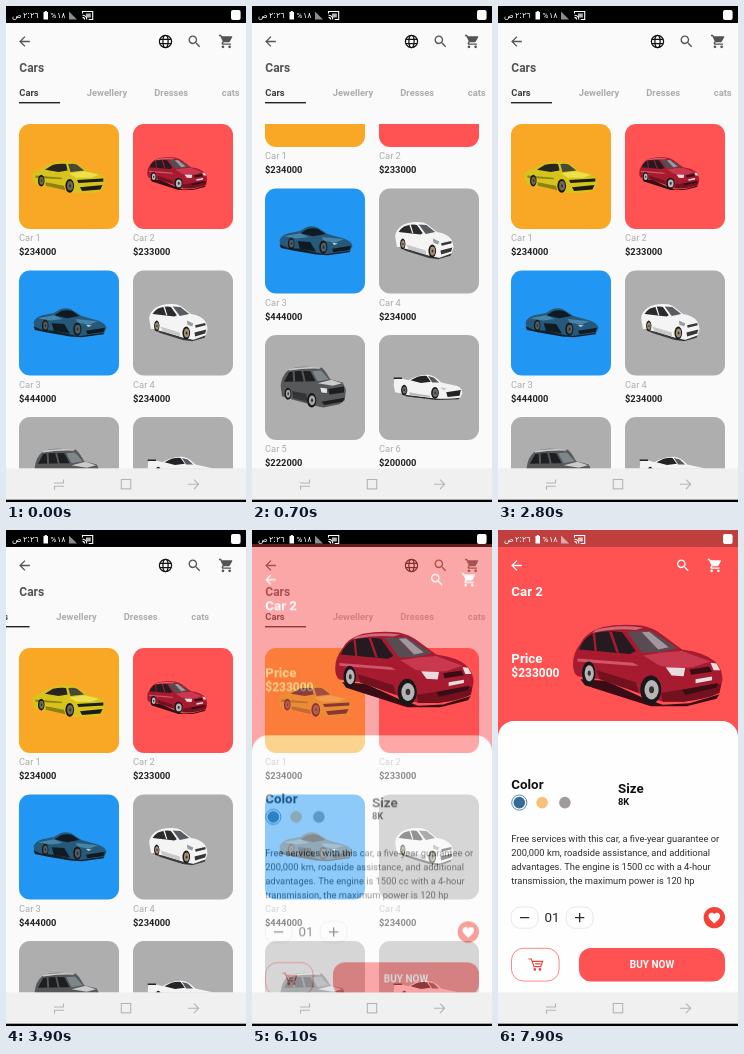
Animation, 240 px wide and 496 px high, one loop 8 s. Source, as an HTML page with a canvas:

```html
<!DOCTYPE html>
<html lang="en">
<head>
<meta charset="utf-8">
<title>Car shop</title>
<style>
html, body { margin: 0; width: 100%; height: 100%; overflow: hidden; background: #fafafa; }
canvas { display: block; width: 240px; height: 496px; }
</style>
</head>
<body>
<canvas id="stage"></canvas>
<script>
const W = 240, H = 496, LOOP = 8000, STEP = 100;
const NAV_TOP = 462.5, GRID_TOP = 118, ROW = 146.5;
const RED = '#ff5252', GREY = '#aeaeae', TEXT = '#535353', LIGHT = '#acacac';
const ratio = Math.max(1, window.devicePixelRatio || 1);

function surface(canvas) {
  canvas.width = W * ratio;
  canvas.height = H * ratio;
  const c = canvas.getContext('2d');
  c.scale(ratio, ratio);
  return c;
}
const screen = surface(document.getElementById('stage'));
const layer = surface(document.createElement('canvas'));
let g = screen;

// ---- drawing helpers ----
function text(str, x, y, size, color, weight = 400, align = 'left', family = 'Roboto') {
  g.font = `${weight} ${size}px ${family}, sans-serif`;
  g.textAlign = align;
  g.fillStyle = color;
  g.fillText(str, x, y);
}

function rect(x, y, w, h, color) {
  g.fillStyle = color;
  g.fillRect(x, y, w, h);
}

function roundRect(x, y, w, h, r, fill, stroke, line = 0.8) {
  g.beginPath();
  g.roundRect(x, y, w, h, r);
  if (fill) { g.fillStyle = fill; g.fill(); }
  if (stroke) { g.strokeStyle = stroke; g.lineWidth = line; g.stroke(); }
}

function oval(x, y, rx, ry, color) {
  g.beginPath();
  g.ellipse(x, y, rx, ry, 0, 0, Math.PI * 2);
  g.fillStyle = color;
  g.fill();
}

function lines(d, color, width) {
  g.strokeStyle = color;
  g.lineWidth = width;
  g.stroke(new Path2D(d));
}

const ICONS = {
  back: 'M20 11H7.83l5.59-5.59L12 4l-8 8 8 8 1.41-1.41L7.83 13H20v-2z',
  search: 'M15.5 14h-.79l-.28-.27A6.47 6.47 0 0 0 16 9.5 6.5 6.5 0 1 0 9.5 16c1.61 0 3.09-.59 4.23-1.57l.27.28v.79l5 4.99L20.49 19l-4.99-5zm-6 0C7.01 14 5 11.99 5 9.5S7.01 5 9.5 5 14 7.01 14 9.5 11.99 14 9.5 14z',
  cart: 'M7 18c-1.1 0-1.99.9-1.99 2S5.9 22 7 22s2-.9 2-2-.9-2-2-2zM17 18c-1.1 0-1.99.9-1.99 2s.89 2 1.99 2 2-.9 2-2-.9-2-2-2zM1 2v2h2l3.6 7.59-1.35 2.45c-.16.28-.25.61-.25.96 0 1.1.9 2 2 2h12v-2H7.42c-.14 0-.25-.11-.25-.25l.03-.12.9-1.63h7.45c.75 0 1.41-.41 1.75-1.03l3.58-6.49A1 1 0 0 0 20 4H5.21l-.94-2H1z',
  heart: 'M12 21.35l-1.45-1.32C5.4 15.36 2 12.28 2 8.5 2 5.42 4.42 3 7.5 3c1.74 0 3.41.81 4.5 2.09C13.09 3.81 14.76 3 16.5 3 19.58 3 22 5.42 22 8.5c0 3.78-3.4 6.86-8.55 11.54L12 21.35z'
};

function icon(name, cx, cy, color, size = 16) {
  g.save();
  g.translate(cx - size / 2, cy - size / 2);
  g.scale(size / 24, size / 24);
  g.fillStyle = color;
  g.fill(new Path2D(ICONS[name]));
  g.restore();
}

function globe(cx, cy) {
  g.strokeStyle = '#111';
  g.lineWidth = 1.25;
  for (const rx of [6.1, 2.6]) {
    g.beginPath();
    g.ellipse(cx, cy, rx, 6.1, 0, 0, Math.PI * 2);
    g.stroke();
  }
  lines(`M${cx - 5.6} ${cy - 2.1}h11.2M${cx - 5.6} ${cy + 2.1}h11.2`, '#111', 1.25);
}

// ---- cars: flat shapes in a space 100 units wide ----
const CARS = [
  { x: 13.5, y: 37, w: 73, rim: '#6d6a50', wheels: [[51, 34, 6, 9.5], [12, 27, 4.5, 8]], parts: [
    ['#d6c41c', 'M0 20Q1 13 10 12L24 4Q36-1 54 1Q64 3 73 13L92 18Q99 21 99 28L97 38Q92 43 78 44L58 44L46 40L14 34L2 31Z'],
    ['#8f8212', 'M18 29L43 34L45 40L18 34ZM4 20L40 23L40 25L4 23Z'],
    ['#26261e', 'M17 12L28 5Q38 3 46 4L48 13L36 15Z'],
    ['#4a4936', 'M49 4Q58 3 61 5L71 13L52 15Z'],
    ['#eee04c', 'M50 17L71 14L91 19L80 23L60 23Z'],
    ['#1d1c12', 'M61 26L97 24L97 28L63 30ZM65 36L96 33L93 39L68 41Z']] },
  { x: 14.2, y: 33, w: 60, rim: '#b8b4b6', wheels: [[52, 44, 7, 9.5], [10.5, 33, 4.5, 8]], parts: [
    ['#3a0d16', 'M5 37L22 38L46 49L60 54L78 53L98 47L96 50L76 55L52 55L8 41Z'],
    ['#a61b30', 'M0 27Q0 19 5 13Q9 5 20 2Q32-.5 46 1Q54 3 58 6L73 17Q88 19 95 25Q100 30 100 37L98 46Q90 50 74 52L60 52L43 46L18 37L3 35Q0 33 0 27Z'],
    ['#74111f', 'M16 31L42 39L44 46L18 37ZM59 46L99 40L98 46Q90 50 74 52L60 52Z'],
    ['#d06a76', 'M15 4Q30 0 47 2.5L42 4Q28 2.5 13 6Z'],
    ['#251a1f', 'M4 17Q7 9 14 6Q24 4 33 5.5L42 18L38 20Z'],
    ['#a61b30', 'M13 6L14.5 18L16 18.2L14.8 6ZM24 5L29 19L30.8 19.2L26 5Z'],
    ['#584b52', 'M36 5L52 4.5L70 16Q58 19.5 46 19Z'],
    ['#a3979d', 'M46 5.5L51 5.2L64 15.5L57 17Z'],
    ['#c8384e', 'M47 21Q60 18.5 73 18L92 25L80 29Q68 30 58 28Z'],
    ['#e8dcdf', 'M62 29L75 29.5L74 35L66 34.5ZM92 26L96 26.5L98.5 31L94 31Z'],
    ['#3a0c14', 'M78 30.5L91 28.5L93 32L79 34ZM73 44L97 39.5L96 42.5L75 47.5Z'],
    ['#e2e0e0', 'M82 37L93 35.2L93 37.6L82 39.6Z'],
    ['#d4546a', 'M3 23L40 26L44 28L40 28L3 25Z']] },
  { x: 14.5, y: 37.5, w: 73, rim: '#4d5b64', wheels: [[60, 29, 5.5, 9], [16, 24, 4.5, 8]], parts: [
    ['#265879', 'M0 20Q2 13 12 10L28 7L36 2Q44-1 52 2L66 11L88 17Q99 21 100 27L97 34Q84 38 66 38L54 37L20 32L2 29Z'],
    ['#0f1a23', 'M29 10L38 4Q46 2 53 4L63 11L46 14ZM25 21L42 22L50 35L28 31ZM72 31L98 27L96 33L74 36Z'],
    ['#10202b', 'M0 25L12 30L30 31L54 37L66 38L97 34L96 36L66 40L50 39L20 34L2 30Z'],
    ['#4585aa', 'M58 15L88 18L76 23L60 20ZM6 14L28 10L40 15L24 17Z'],
    ['#c3d2da', 'M72 23L80 24L75 26Z']] },
  { x: 15.5, y: 33, w: 59, rim: '#a08f70', wheels: [[64, 50, 6.5, 11], [14, 38, 4.5, 9]], parts: [
    ['#3c3c3e', 'M4 42L24 46L60 58L76 62L97 54L95 58L74 64L58 62L20 50Z'],
    ['#f4f4f4', 'M1 25Q2 15 11 8Q24 0 40 1Q50 1 56 5L72 18Q90 21 96 30Q100 36 100 44L97 54L76 61L62 59L26 48L4 43Z'],
    ['#c8c8ca', 'M20 39L53 49L54 56L24 47Z'],
    ['#2b2b2e', 'M7 18Q12 9 20 7Q32 4 38 6L48 20L44 22Z'],
    ['#f4f4f4', 'M25 5L30 20L32 20L27.5 5Z'],
    ['#585b60', 'M41 5L54 6L69 18L53 21Z'],
    ['#9b9ca0', 'M65 29L76 34L74 39L66 36Z'],
    ['#363638', 'M79 37L96 33L97 37L80 41ZM78 49L98 44L96 51L79 56Z']] },
  { x: 15, y: 31, w: 66, rim: '#a4a6a8', wheels: [[48, 52, 7, 11], [12, 42, 5, 9]], parts: [
    ['#56585a', 'M1 30Q3 14 12 7Q20 1 36 1L62 2Q67 4 76 20L95 25L100 36L98 52L90 58L66 63L56 61L20 51L3 46Z'],
    ['#c8cacc', 'M13 5Q30 0 62 2L60 4Q36 3 14 7ZM57 26L78 21L94 26L80 30Z'],
    ['#1d1e20', 'M6 24L14 9Q28 7 46 8L54 23ZM73 35L97 31L97 40L75 43ZM63 54L98 48L95 54L67 59Z'],
    ['#56585a', 'M19 7L20 24L23 24L22 7ZM32 7L36 24L39 24L35 7Z'],
    ['#7d868b', 'M49 8L62 7L74 20L57 23Z'],
    ['#e4e6e8', 'M61 33L71 34L71 41L63 40Z'],
    ['#333436', 'M18 38L40 42L41 54L20 49Z']] },
  { x: 14, y: 39, w: 70, rim: '#6a6a6c', wheels: [[60, 27, 5.5, 8.5], [16, 23, 4.5, 7.5]], parts: [
    ['#2c2c2e', 'M4 25L20 29L62 35L96 33L94 36L62 37L20 32Z'],
    ['#f3f3f3', 'M1 16L2 6L12 6L22 9Q34 1 50 1Q60 2 69 12L92 17Q99 20 99 27L96 34Q80 36 62 35L20 30L3 26Z'],
    ['#232325', 'M25 9L35 4Q44 2 48 3L54 11L40 13ZM1 5L13 5L13 7L1 7ZM76 26L97 23L95 31L78 33Z'],
    ['#55585c', 'M50 3L58 5L66 12L56 12Z'],
    ['#bcbcbe', 'M23 26L53 31L53 34L24 30ZM68 19L77 21L72 23Z']] }
];

function car(i, x, y, w) {
  const model = CARS[i];
  g.save();
  g.translate(x, y);
  g.scale(w / 100, w / 100);
  for (const [color, d] of model.parts) {
    g.fillStyle = color;
    g.fill(new Path2D(d));
  }
  for (const [cx, cy, rx, ry] of model.wheels) {
    oval(cx, cy, rx, ry, '#18181a');
    oval(cx + rx * 0.08, cy, rx * 0.68, ry * 0.68, model.rim);
    oval(cx + rx * 0.08, cy, rx * 0.24, ry * 0.24, '#333');
  }
  g.restore();
}

// ---- time helpers ----
const clamp = v => Math.min(1, Math.max(0, v));
const phase = (t, from, to) => clamp((t - from) / (to - from));
const mix = (a, b, p) => a + (b - a) * p;
const inOut = p => p < 0.5 ? 4 * p ** 3 : 1 - (2 - 2 * p) ** 3 / 2;

// Cubic bezier (.4, 0, .2, 1)
function settle(p) {
  let lo = 0, hi = 1;
  for (let i = 0; i < 20; i++) {
    const s = (lo + hi) / 2, r = 1 - s;
    if (1.2 * r * r * s + 0.6 * r * s * s + s ** 3 < p) lo = s; else hi = s;
  }
  return 3 * (1 - lo) * lo * lo + lo ** 3;
}

// ---- screens ----
const SHADES = ['#f9a825', RED, '#2196f3', GREY, GREY, GREY];
const PRICES = [234000, 233000, 444000, 234000, 222000, 200000];
const TABS = ['Cars', 'Jewellery', 'Dresses', 'cats'];
const ABOUT = [
  'Free services with this car, a five-year guarantee or',
  '200,000 km, roadside assistance, and additional',
  'advantages. The engine is 1500 cc with a 4-hour',
  'transmission, the maximum power is 120 hp'
];

function listPage(scroll, tabScroll, flying) {
  rect(0, 0, W, H, '#fafafa');
  rect(0, 0, W, 17, '#000');
  icon('back', 18.5, 35.5, TEXT);
  globe(159.5, 35.5);
  icon('search', 188.5, 35.5, TEXT);
  icon('cart', 220.3, 35.5, TEXT);
  text('Cars', 13.3, 65.6, 12, TEXT, 700);

  TABS.forEach((name, i) => {
    text(name, 13.3 + i * 67.5 - tabScroll, 90.3, 9.33, i ? LIGHT : '#3c3c3c', 700);
  });
  rect(13 - tabScroll, 96, 41, 1.4, '#222');

  g.save();
  g.beginPath();
  g.rect(0, GRID_TOP, W, NAV_TOP - GRID_TOP);
  g.clip();
  SHADES.forEach((shade, i) => {
    const x = i % 2 ? 127 : 13;
    const y = GRID_TOP + Math.floor(i / 2) * ROW - scroll;
    roundRect(x, y, 100, 105, 11, shade);
    if (!(flying && i === 1)) car(i, x + CARS[i].x, y + CARS[i].y, CARS[i].w);
    text('Car ' + (i + 1), x, y + 117.3, 9.33, LIGHT);
    text('$' + PRICES[i], x, y + 131.4, 9.33, '#212121', 700);
  });
  g.restore();
}

function detailPage() {
  rect(0, 0, W, H, RED);
  icon('back', 18.5, 35.5, '#fff');
  icon('search', 185, 35.5, '#fff');
  icon('cart', 217, 35.5, '#fff');
  text('Car 2', 13.3, 65.7, 13.33, '#fff', 700);
  text('Price', 13.3, 132.8, 13.33, '#fff', 700);
  text('$233000', 13.3, 147.3, 12, '#fff', 700);
  roundRect(0, 191, W, 330, [16, 16, 0, 0], '#fefefe');

  text('Color', 13.3, 258.8, 13.33, '#111', 700);
  g.beginPath();
  g.arc(21.3, 272.6, 7.6, 0, Math.PI * 2);
  g.strokeStyle = '#356c95';
  g.lineWidth = 0.8;
  g.stroke();
  ['#356c95', '#f8c078', '#a09b9b'].forEach((c, i) => oval(21.3 + i * 22.8, 272.6, 5.8, 5.8, c));
  text('Size', 120, 263, 13.33, '#111', 700);
  text('8K', 120, 275.4, 9.33, '#111', 700);
  ABOUT.forEach((line, i) => text(line, 13.3, 312.4 + i * 14, 9.33, '#2c2c2c'));

  for (const x of [13.3, 68.3]) roundRect(x, 377, 26.7, 21.3, 8.7, null, '#dedede', 0.7);
  lines('M22 387.6h9.3M77 387.6h9.3M81.65 383v9.3', '#2a2a2a', 1.3);
  text('01', 46.6, 392.3, 13.33, '#222');
  oval(216.3, 387.6, 10.7, 10.7, '#f44336');
  icon('heart', 216.3, 388, '#fff', 14);

  roundRect(13.5, 418.3, 47.6, 32.8, 12, null, RED, 0.7);
  lines('M30.5 429h2.8l2.8 7.6h6.6l1.9-5.2H34.4M37 433.8h5.6', '#e0453f', 1.2);
  oval(36.8, 439.4, 1.3, 1.3, '#e0453f');
  oval(42, 439.4, 1.3, 1.3, '#e0453f');
  roundRect(81, 418, 146, 33.4, 12, RED);
  text('BUY NOW', 154, 438.3, 10, '#fff', 700, 'center');
}

function statusIcons() {
  const glyphs = (s, x) => text(s, x, 12, 8, '#fff', 400, 'left', '"DejaVu Sans"');
  glyphs('ص', 6);
  glyphs('٢:٢٦', 17);
  rect(37.5, 6, 4.5, 7.5, '#fff');
  rect(38.8, 5, 2, 1.2, '#fff');
  text('%', 44.5, 12.4, 8, '#fff');
  glyphs('١٨', 51);
  g.fillStyle = 'rgba(255,255,255,.55)';
  g.fill(new Path2D('M63 5.5L71 13.5H63Z'));
  lines('M76.5 7.5v-2h10.2v8h-4M76.5 9.2a4.3 4.3 0 0 1 4.3 4.3M76.5 11.4a2.1 2.1 0 0 1 2.1 2.1', '#fff', 1.1);
  rect(80, 7.5, 4.8, 4, 'rgba(255,255,255,.7)');
  roundRect(225, 4, 9.6, 10, 2, '#fff');
}

function navBar() {
  rect(0, NAV_TOP, W, H, '#f0f0f0');
  lines('M48 477h9.5v-3.5M58 480.2h-9.5v3.5', '#b4b4b4', 1.1);
  g.strokeRect(115.3, 473.5, 9.4, 9.4);
  lines('M182 478.3h10.5M188 473.6l4.7 4.7l-4.7 4.7', '#b4b4b4', 1.1);
  rect(0, 493.7, W, 3, '#000');
}

function draw(t) {
  const scroll = 82 * (inOut(phase(t, 50, 700)) - inOut(phase(t, 900, 1855)));
  const tabScroll = 30.5 * (inOut(phase(t, 2800, 3550)) - inOut(phase(t, 4350, 5080)));
  const open = phase(t, 5920, 6220);
  const moved = settle(open);

  g = screen;
  listPage(scroll, tabScroll, open > 0);
  if (open > 0) {
    g = layer;
    detailPage();
    g = screen;
    g.globalAlpha = open ** 1.4;
    g.drawImage(layer.canvas, 0, (1 - moved) * 115, W, H);
    g.globalAlpha = 1;
    const start = CARS[1];
    car(1, mix(127 + start.x, 75, moved), mix(GRID_TOP + start.y, 94, moved), mix(start.w, 149.5, moved));
  }
  rect(0, 0, W, 17, 'rgba(0,0,0,.25)');
  statusIcons();
  navBar();
}

const began = performance.now();
function tick() {
  const t = (performance.now() - began) % LOOP;
  draw(Math.floor(t / STEP) * STEP);
  requestAnimationFrame(tick);
}
tick();
</script>
</body>
</html>
```
